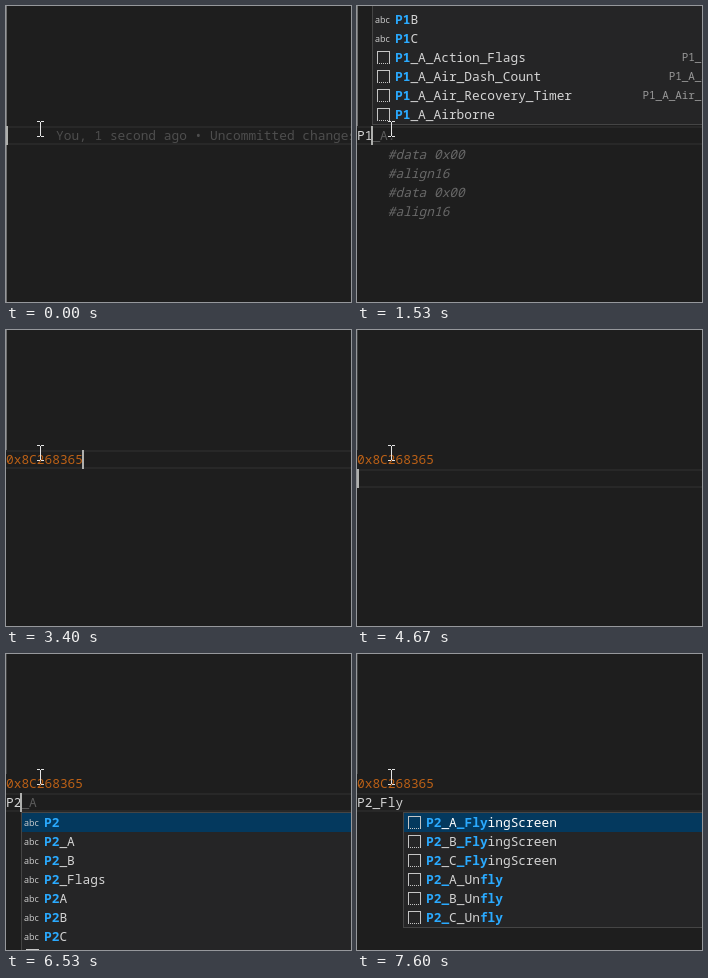
Write an HTML page with a canvas that moves like this. It is 345 px wide and 296 px high and loops after 8 s.

```html
<!DOCTYPE html>
<html lang="en">
<head>
<meta charset="utf-8">
<title>Editor completion</title>
<style>
html, body { margin: 0; width: 100%; height: 100%; overflow: hidden; background: #1e1e1e; }
canvas { display: block; }
</style>
</head>
<body>
<canvas width="345" height="296"></canvas>
<script>
const ctx = document.querySelector('canvas').getContext('2d');
const W = 345, H = 296, LOOP = 8000, ROW = 19, CHAR = 7.697, LINE1 = 120;
const MONO = '"Noto Sans Mono", "DejaVu Sans Mono", monospace';
const FG = '#d4d4d4', ORANGE = '#bd6116', BLUE = '#2aaaff';
const HEX = '0x8C268365';

// Names of plain words are marked with a leading "~"; the rest are snippets.
const words = (p, ...ends) => ends.map(e => '~' + p + e);
const snips = (p, ...ends) => ends.map(e => p + e);
const MOVES = ['Action_Flags', 'Air_Dash_Count', 'Air_Recovery_Timer', 'Airborne'];
const CORNER = ['Color', 'Corner_Touch', 'CornerJump'];
const FLY = snips('P2_', 'A_FlyingScreen', 'B_FlyingScreen', 'C_FlyingScreen');

const listP = words('P1', '', '_A', '_B', '_C', '_Flags', 'A', 'B', 'C').concat('~P2');
const listP1 = [...words('P1', 'B', 'C'), ...snips('P1_A_', ...MOVES)];
const listP1_ = snips('P1_A_', ...MOVES.slice(2), ...CORNER, 'Damage');
const listP1A = snips('P1_A_', ...MOVES.slice(3), ...CORNER, 'Damage', 'Facing');
const listP1AC = [...snips('P1_A_', ...CORNER, 'SJ_Counter'), ...snips('P1_C_', ...MOVES), 'P1_C_Color'];
const listP2 = [...words('P2', '', '_A', '_B', '_Flags', 'A', 'B', 'C'), 'P2_A_Action_Flags'];
const listP2_ = [...words('P2_', 'A', 'B', 'Flags'), ...snips('P2_A_', ...MOVES, 'Color')];
const listP2F = ['~P2_Flags', ...FLY, ...snips('P2_', 'A_Action_Flags', 'B_Action_Flags', 'C_Action_Flags')];
const listFly = [...FLY, ...snips('P2_', 'A_Unfly', 'B_Unfly', 'C_Unfly')];

const popup = (col, items, marks, above = false) => ({ col, items, marks, above });

// Each step changes only the listed parts of the state.
const steps = [
  [0, { line: 0, text: '', color: FG, caret: true, blame: true, ghost: '', block: false, popup: null }],
  [400, { caret: false }],
  [870, { caret: true }],
  [1200, { text: 'P', blame: false, popup: popup(1, listP, /^P/g) }],
  [1470, { text: 'P1' }],
  [1530, { ghost: '_A:', block: true, popup: popup(2, listP1, /^P1/g, true) }],
  [1870, { text: 'P1_', ghost: 'A:', popup: popup(3, listP1_, /^P1_/g, true) }],
  [2000, { text: 'P1_A', ghost: ':', popup: popup(4, listP1A, /^P1_A/g, true) }],
  [2330, { text: 'P1_AC', ghost: '', block: false,
           popup: popup(5, listP1AC, /^P1_(A(?=_))?|(?<=^P1_)C|(?<=^P1_A_.*)C|(?<=^P1_C_)A/g) }],
  [2800, { caret: false }],
  [3330, { text: HEX, caret: true, popup: null }],
  [3400, { color: ORANGE }],
  [3800, { ghost: ': #data' }],
  [3870, { caret: false }],
  [4400, { caret: true }],
  [4670, { line: 1, text: '', color: FG, ghost: '' }],
  [5070, { ghost: HEX }],
  [5200, { caret: false }],
  [5670, { caret: true }],
  [5800, { text: 'P', ghost: '', popup: popup(1, listP, /^P/g) }],
  [6130, { text: 'P2' }],
  [6200, { popup: popup(2, listP2, /^P2/g) }],
  [6530, { ghost: '_A' }],
  [6670, { text: 'P2_', ghost: 'A', popup: popup(3, listP2_, /^P2_/g) }],
  [6870, { text: 'P2_F', ghost: '', popup: popup(4, listP2F, /^P2(_(?=F))?|_F/g) }],
  [7000, { text: 'P2_Fl', popup: popup(5, listP2F, /^P2(_(?=F))?|_Fl/g) }],
  [7130, { text: 'P2_Fly', popup: popup(6, listFly, /^P2(_(?=._U))?|_Fly|fly/g) }],
  [7600, { caret: false }],
];

function rect(x, y, w, h, color) {
  ctx.fillStyle = color;
  ctx.fillRect(x, y, w, h);
}

// Sets text on the character grid; lit(i) picks the emphasised letters.
function type(text, x, y, color, { style = '', scale = 1, lit = () => false } = {}) {
  [...text].forEach((c, i) => {
    const on = lit(i);
    ctx.font = `${on ? 'bold' : style} ${12.83 * scale}px ${MONO}`;
    ctx.fillStyle = on ? BLUE : color;
    ctx.fillText(c, x + i * CHAR * scale, y);
  });
}

function drawIcon(isWord, x, y) {
  if (isWord) {
    ctx.font = '9px "Open Sans", "Noto Sans", sans-serif';
    ctx.fillStyle = '#d0d0d0';
    ctx.fillText('abc', x + 3, y + 13);
    return;
  }
  const c = '#c5c5c5';
  rect(x + 5, y + 3, 13, 1, c);
  rect(x + 5, y + 3, 1, 12, c);
  rect(x + 17, y + 3, 1, 12, c);
  for (let i = 0; i < 13; i += 2) rect(x + 5 + i, y + 15, 1, 1, c);
}

function drawPopup({ col, items, marks, above }, lineTop) {
  const x = Math.round(col * CHAR), h = items.length * ROW + 2;
  const top = above ? lineTop - 2 - items.length * ROW : lineTop + ROW + 1;
  const frameTop = above ? -2 : top - 1;
  const frameH = above ? lineTop - frameTop - 1 : h;
  rect(x, frameTop, W, frameH, '#454545');
  rect(x + 1, frameTop + 1, W, frameH - 2, '#252526');
  items.forEach((item, i) => {
    const y = top + i * ROW, isWord = item[0] === '~', name = item.replace('~', '');
    const selected = i === 0 && !above;
    if (selected) rect(x + 1, y, W, ROW, '#04395e');
    drawIcon(isWord, x, y);
    const hits = [...name.matchAll(marks)];
    const lit = k => hits.some(m => k >= m.index && k < m.index + m[0].length);
    type(name, x + 23, y + 14, selected ? '#fff' : FG, { lit });
    if (!isWord && !selected) {
      type(name, x + 421 - name.length * CHAR * 0.85, y + 13, '#989898', { scale: 0.85 });
    }
  });
}

function drawPointer() {
  const c = '#e4e4e4';
  rect(34, 116, 1, 14, c);
  for (const y of [115, 130]) {
    rect(31, y, 3, 1, c);
    rect(35, y, 3, 1, c);
  }
}

function draw(t) {
  const s = Object.assign({}, ...steps.filter(([at]) => at <= t).map(([, change]) => change));
  const top = LINE1 + s.line * ROW, base = top + 14;
  rect(0, 0, W, H, '#1e1e1e');
  rect(0, top, W, 2, '#282828');
  rect(0, top + 17, W, 2, '#282828');
  rect(0, 0, 1, LINE1, s.line ? '#404040' : '#707070');

  if (s.blame) {
    rect(0, LINE1 + ROW, 1, H, '#707070');
    type('You, 1 second ago • Uncommitted changes', 50, base, '#4e4e4e');
  }
  if (s.line) type(HEX, 0, LINE1 + 14, ORANGE);
  type(s.text, 0, base, s.color);
  const end = s.text.length * CHAR;
  type(s.ghost, end, base, s.text ? '#5c5c5c' : '#747474', { style: s.text ? '' : 'italic' });
  if (s.block) {
    ['#data 0x00', '#align16', '#data 0x00', '#align16'].forEach((code, i) =>
      type(code, 4 * CHAR, base + (i + 1) * ROW, '#686868', { style: 'italic' }));
  }
  if (s.popup) drawPopup(s.popup, top);
  if (s.caret) rect(Math.max(0, Math.round(end) - 1), top, 2, ROW, '#aeafad');
  drawPointer();
}

const start = performance.now();
function frame() {
  draw((performance.now() - start) % LOOP);
  requestAnimationFrame(frame);
}
frame();
</script>
</body>
</html>
```
